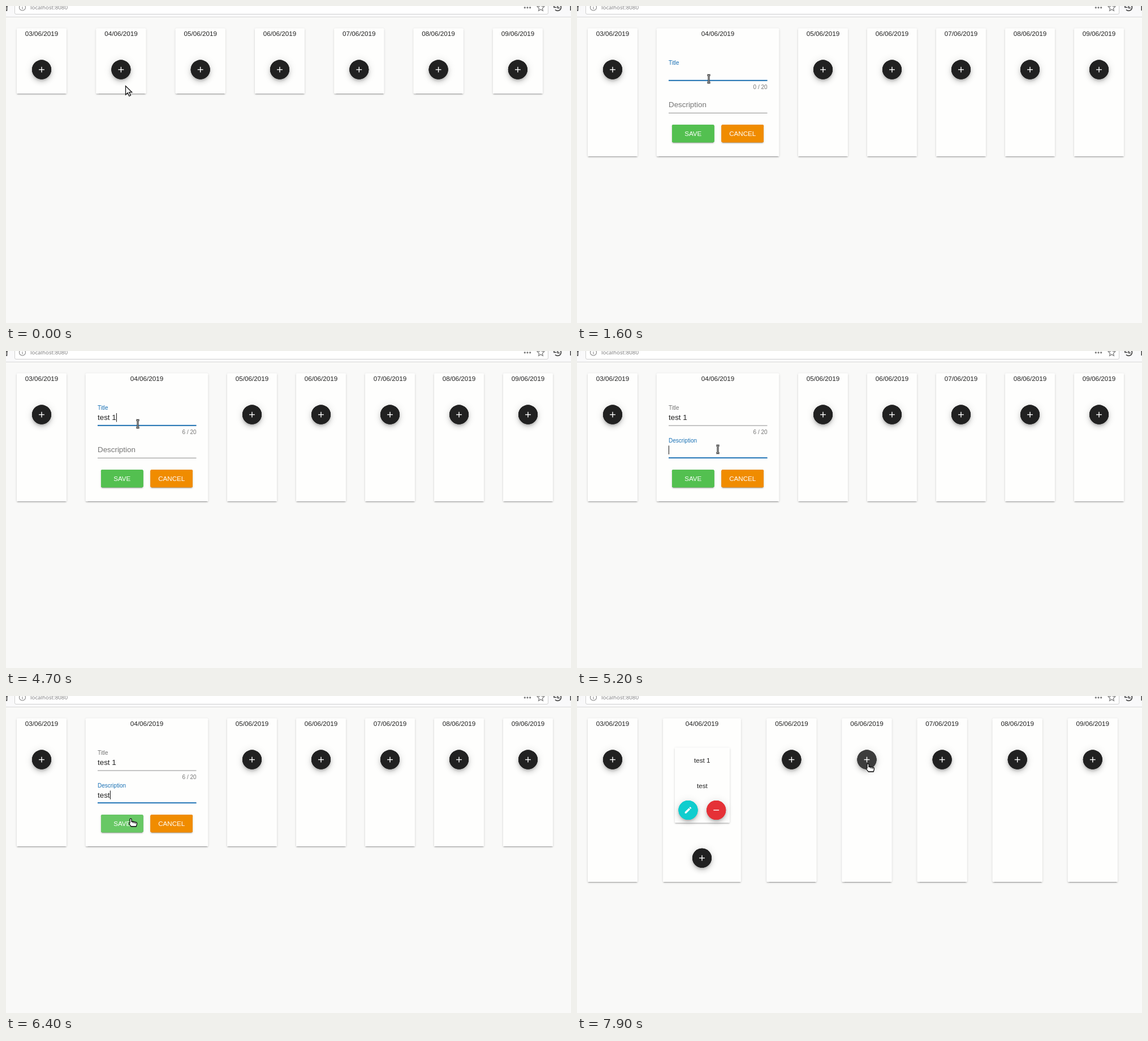
Animation, 999 px wide and 561 px high, one loop 8000 ms. Source, as an HTML page with a canvas:

```html
<!DOCTYPE html>
<html lang="en">
<head>
<meta charset="utf-8">
<title>Week planner</title>
<style>
  html, body { margin: 0; width: 100%; height: 100%; overflow: hidden; background: #f9f9f8; }
  canvas { display: block; }
</style>
</head>
<body>
<canvas id="stage" width="999" height="561"></canvas>
<script>
const ctx = document.getElementById('stage').getContext('2d');
const LOOP = 8000, STEP = 100;
const SANS = '"Liberation Sans", Arial, sans-serif';
const INK = 'rgba(0,0,0,.87)', MUTED = 'rgba(0,0,0,.54)', BLUE = '#1971b5';
const CARD_SHADOW = [[3, 1, -2, .2], [2, 2, 0, .14], [1, 5, 0, .12]];
const FAB_SHADOW = [[3, 5, -1, .2], [6, 10, 0, .14], [1, 18, 0, .12]];
const SCALE = .835;

// Bottom edge, centre and half width of the second card, centre and spacing of the rest
const LAYOUTS = {
  empty: { bottom: 155, wide: 203.4, half: 44, next: 343.7, gap: 140.3 },
  form: { bottom: 266, wide: 249, half: 108.2, next: 435, gap: 122 },
  saved: { bottom: 329, wide: 221, half: 68.8, next: 379.4, gap: 133.1 }
};

// Pointer path: time, x, y, shape
const POINTER = [
  [0, 211.5, 141.5, 'arrow'], [100, 212, 141, 'arrow'], [200, 212, 141, 'arrow'],
  [300, 207, 123, 'hand'], [400, 207, 126, 'hand'], [500, 207, 129, 'beam'],
  [800, 207, 129, 'beam'], [1300, 233, 129, 'beam'], [4700, 233, 129, 'beam'],
  [4900, 249, 174, 'beam'], [6100, 249, 174, 'beam'], [6200, 240, 192, 'arrow'],
  [6300, 224, 213, 'hand'], [6500, 217, 221, 'hand'], [6600, 217, 221, 'hand'],
  [6700, 217, 221, 'arrow'], [6800, 207, 237, 'arrow'], [7100, 207, 237, 'arrow'],
  [7200, 207, 238, 'arrow'], [7300, 207, 238, 'arrow'], [7400, 340, 161, 'arrow'],
  [7500, 340, 161, 'arrow'], [7600, 420, 140, 'arrow'], [7700, 500, 117, 'hand'],
  [7900, 514.5, 120, 'hand']
];

const TITLE = {
  label: 'Title', y: 122, focus: 1000, blur: 4900, hover: [500, 1000], caretOff: [[1600, 1900], [3700, 4300]],
  typed: [[1900, 't'], [2100, 'te'], [2400, 'tes'], [2700, 'test'], [4300, 'test 1']]
};
const DETAILS = {
  label: 'Description', y: 179.4, focus: 4900, blur: 6700, hover: [4800, 4900], caretOff: [[5500, 5700]],
  typed: [[5700, 't'], [5800, 'te'], [5900, 'tes'], [6000, 'test']]
};

const within = (t, [a, b]) => t >= a && t < b;
const lerp = (a, b, k) => a + (b - a) * k;
const easeOut = k => 1 - (1 - Math.min(1, Math.max(0, k))) ** 3;
const latest = (keys, t) => keys.filter(k => k[0] <= t).pop();

function text(str, x, y, size, color = INK, align = 'left', family = SANS) {
  ctx.font = `${size}px ${family}`;
  ctx.fillStyle = color;
  ctx.textAlign = align;
  ctx.fillText(str, x, y);
}

function rect(x, y, w, h, color) {
  ctx.fillStyle = color;
  ctx.fillRect(x, y, w, h);
}

function strokePath(d, color, width) {
  ctx.strokeStyle = color;
  ctx.lineWidth = width;
  ctx.stroke(new Path2D(d));
}

function raised(x, y, w, h, radius, color, shadows) {
  const fill = (inset, style) => {
    ctx.beginPath();
    ctx.roundRect(x + inset, y + inset, w - 2 * inset, h - 2 * inset, Math.max(0, radius - inset));
    ctx.fillStyle = style;
    ctx.fill();
  };
  for (const [dy, blur, spread, alpha] of shadows) {
    ctx.save();
    ctx.shadowColor = `rgba(0,0,0,${alpha})`;
    ctx.shadowOffsetY = dy * SCALE;
    ctx.shadowBlur = blur * SCALE;
    fill(-spread * SCALE, color);
    ctx.restore();
  }
  fill(0, color);
}

function fab(x, y, color, icon, hover) {
  raised(x - 17, y - 17, 34, 34, 17, color, FAB_SHADOW);
  if (hover) {
    ctx.beginPath();
    ctx.arc(x, y, 17, 0, 7);
    ctx.fillStyle = 'rgba(255,255,255,.12)';
    ctx.fill();
  }
  if (icon === 'edit') {
    ctx.save();
    ctx.translate(x - 7.7, y - 7.7);
    ctx.scale(.64, .64);
    ctx.fillStyle = '#fff';
    ctx.fill(new Path2D('M3 17.25V21h3.75L17.8 9.9l-3.7-3.7zM20.7 7c.4-.4.4-1 0-1.4l-2.3-2.3c-.4-.4-1-.4-1.4 0l-1.9 1.8 3.8 3.8z'));
    ctx.restore();
    return;
  }
  rect(x - 4.9, y - .7, 9.8, 1.4, '#fff');
  if (icon === 'add') rect(x - .7, y - 4.9, 1.4, 9.8, '#fff');
}

function button(label, x, color, hover) {
  raised(x, 210.3, 74.5, 31, 2, color, CARD_SHADOW);
  if (hover) rect(x, 210.3, 74.5, 31, 'rgba(255,255,255,.12)');
  text(label, x + 37.2, 230.4, 11.6, '#fff', 'center');
}

function field(f, t) {
  const left = 162, width = 174.5, base = f.y;
  const focused = within(t, [f.focus, f.blur]);
  const k = t < f.focus ? 0 : easeOut((t - f.focus + STEP) / 300);
  const lineY = base + 10;
  text(f.label, left, lerp(base, base - 17.8, k), lerp(13.36, 10, k), focused ? BLUE : MUTED);

  rect(left, lineY - .5, width, 1, within(t, f.hover) ? INK : 'rgba(0,0,0,.45)');
  if (focused) rect(left + width * (1 - k) / 2, lineY - 1.2, width * k, 1.9, BLUE);

  const key = latest(f.typed, t);
  const value = key ? key[1] : '';
  text(value, left, base + .2, 13.36);
  if (focused && !f.caretOff.some(span => within(t, span))) {
    rect(Math.round(left + ctx.measureText(value).width) - .1, base - 12, 1, 15.5, '#111');
  }
  return value;
}

function form(t) {
  const title = field(TITLE, t);
  text(`${title.length} / 20`, 336.6, 146.6, 10, MUTED, 'right');
  field(DETAILS, t);
  button('SAVE', 168, '#53c050', within(t, [6300, 6700]));
  button('CANCEL', 255.5, '#f08c00');
}

function savedItem() {
  raised(173, 91.5, 97, 132.8, 1.5, '#fefefd', CARD_SHADOW);
  text('test 1', 221.2, 117.6, 11.7, INK, 'center');
  text('test', 221.4, 162.6, 11.7, INK, 'center');
  fab(196.5, 202, '#10cdce', 'edit');
  fab(246.2, 202, '#e53137', 'remove');
  fab(221, 286.7, '#212121', 'add');
}

function cards(t) {
  const name = t < 500 ? 'empty' : t < 6700 ? 'form' : 'saved';
  const L = LAYOUTS[name];
  for (let i = 0; i < 7; i++) {
    const x = i === 0 ? 63 : i === 1 ? L.wide : L.next + (i - 2) * L.gap;
    const half = i === 1 ? L.half : 44;
    raised(x - half, 39.7, half * 2, L.bottom - 39.7, 1.5, '#fefefd', CARD_SHADOW);
    text(`0${i + 3}/06/2019`, x, 52.6, 11.7, INK, 'center');
    if (i !== 1 || name === 'empty') {
      const hover = i === 1 ? within(t, [300, 500]) : i === 3 && t >= 7700;
      fab(x, 112.6, '#212121', 'add', hover);
    }
  }
  if (name === 'form') form(t);
  if (name === 'saved') savedItem();
}

function toolbar() {
  rect(0, 0, 999, 19, '#f9f9fa');
  rect(0, 19, 999, 1, '#d9d9d9');
  ctx.beginPath();
  ctx.roundRect(15.5, -12, 943, 26.5, 2.5);
  ctx.fillStyle = '#fff';
  ctx.fill();
  ctx.strokeStyle = '#d0d0d0';
  ctx.lineWidth = 1;
  ctx.stroke();

  text('localhost:8080', 43, 6, 9.8, '#777', 'left', '"Open Sans", "Noto Sans", sans-serif');
  strokePath('M34.5 2.5a5.5 5.5 0 1 1-11 0a5.5 5.5 0 1 1 11 0M29 1.5v4M29-1v1.2', '#858585', 1.1);
  for (const x of [917.3, 922, 926.7]) {
    ctx.beginPath();
    ctx.arc(x, 2.8, 1.6, 0, 7);
    ctx.fillStyle = '#777';
    ctx.fill();
  }
  let star = '';
  for (let i = 0; i < 10; i++) {
    const r = i % 2 ? 3.1 : 6.6, a = Math.PI * (i / 5 - .5);
    star += `${i ? 'L' : 'M'}${945.5 + r * Math.cos(a)} ${3 + r * Math.sin(a)}`;
  }
  strokePath(star + 'z', '#858585', 1.3);
  strokePath('M970.5-1A6 6 0 1 1 971 6.5M975.5-1V3.5H979M969-2v4.5h4.5', '#444', 1.7);
  strokePath('M0 1H3M1.5 1V8H0M998.3 0V8', '#444', 1.6);
}

const SHAPES = {
  arrow: 'M0 0V15.6L3.7 12.2L6.3 18L8.9 16.8L6.3 11.2H11.2z',
  hand: 'M-1.5 .8Q0-1 1.5 .8V5.3L4 5L6.3 5.6L8.6 6.1Q11.5 6.4 11 9.5L9.8 13.8H.7L-2.8 9.5Q-3.2 7.4-1.5 7.8z',
  beam: 'M-2.7-6.8H-1.2L0-5.8L1.2-6.8H2.7M0-5.8V5.8M-2.7 6.8H-1.2L0 5.8L1.2 6.8H2.7'
};

function pointer(t) {
  const key = latest(POINTER, t);
  const next = POINTER[POINTER.indexOf(key) + 1] || key;
  const k = next === key ? 0 : (t - key[0]) / (next[0] - key[0]);
  const shape = key[3];
  ctx.save();
  ctx.translate(lerp(key[1], next[1], k), lerp(key[2], next[2], k));
  if (shape === 'beam') {
    strokePath(SHAPES.beam, '#111', 3);
    strokePath(SHAPES.beam, '#fff', .9);
  } else {
    ctx.fillStyle = '#fff';
    ctx.fill(new Path2D(SHAPES[shape]));
    strokePath(SHAPES[shape], '#111', 1.3);
    if (shape === 'hand') strokePath('M4 5.2V8M6.4 5.8V8.4M8.7 6.4V9M.7 14H9.8', '#111', 1.1);
  }
  ctx.restore();
}

function draw(now) {
  const t = Math.floor((now % LOOP) / STEP) * STEP;
  rect(0, 0, 999, 561, '#f9f9f8');
  toolbar();
  cards(t);
  pointer(t);
  requestAnimationFrame(draw);
}

let start;
requestAnimationFrame(function first(now) {
  start = now;
  draw(0);
});
</script>
</body>
</html>
```
